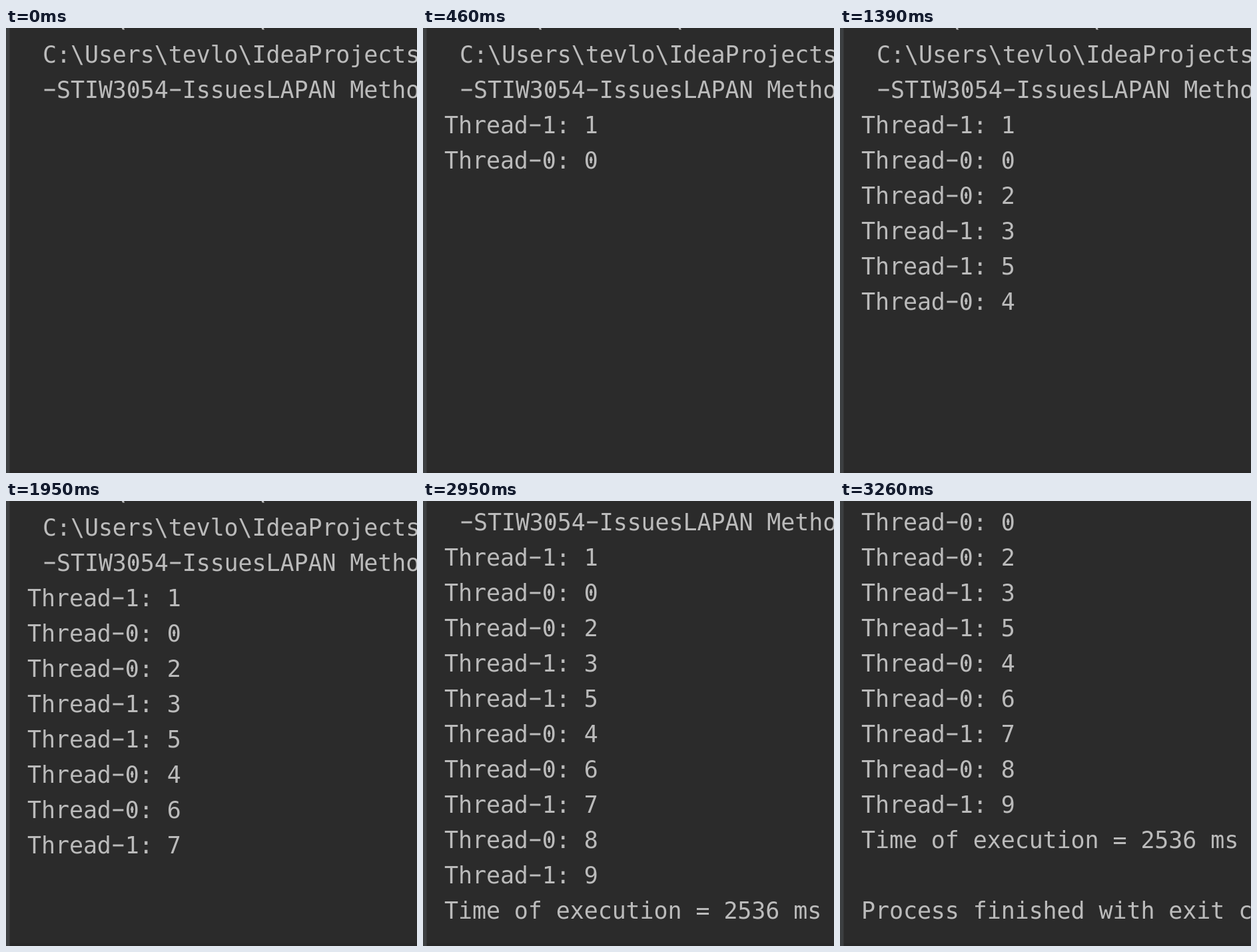
Recreate the animation shown at these times as an HTML page with a canvas. Size 617x668 px, loop 4210 ms.

```html
<!DOCTYPE html>
<html lang="en">
<head>
<meta charset="utf-8">
<title>Console output</title>
<style>
  html, body { margin: 0; width: 100%; height: 100%; overflow: hidden; background: #2b2b2b; }
  canvas { display: block; }
</style>
</head>
<body>
<canvas id="stage" width="617" height="668"></canvas>
<script>
const W = 617, H = 668, LOOP = 4210;
const ROW = 53, CELL = 20.97, LEFT = 32, INDENT = 55, BASE = -1;
const ctx = document.getElementById("stage").getContext("2d");

// Console rows; the first one shows only the feet of its backslashes.
const header = [
  "     \\         \\",
  "C:\\Users\\tevlo\\IdeaProjects\\",
  "-STIW3054-IssuesLAPAN Method"
];
const output = [
  ...["1: 1", "0: 0", "0: 2", "1: 3", "1: 5", "0: 4", "0: 6", "1: 7", "0: 8", "1: 9"]
    .map(s => "Thread-" + s),
  "Time of execution = 2536 ms",
  "",
  "Process finished with exit code 0"
];

// Start time, printed output rows, scroll offset.
const steps = [
  { at: 0, rows: 0, scroll: 0 },
  { at: 460, rows: 2, scroll: 0 },
  { at: 930, rows: 4, scroll: 0 },
  { at: 1390, rows: 6, scroll: 0 },
  { at: 1950, rows: 8, scroll: 0 },
  { at: 2410, rows: 10, scroll: 8 },
  { at: 2950, rows: 11, scroll: 61 },
  { at: 3260, rows: 13, scroll: 167 }
];

function rect(color, x, y, w, h) {
  ctx.fillStyle = color;
  ctx.fillRect(x, y, w, h);
}

// Wide hyphens and zeros with an upright bar, as in a coding font.
function drawRow(text, left, y) {
  [...text].forEach((ch, i) => {
    const x = left + i * CELL;
    if (x > W) return;
    if (ch === "-") ctx.fillRect(x + 2.6, y - 13.5, 16, 3);
    else ctx.fillText(ch, x, y);
    if (ch === "0") ctx.fillRect(x + 9, y - 17.5, 3, 9.5);
  });
}

function draw(t) {
  const step = steps.findLast(s => t >= s.at);
  rect("#2b2b2b", 0, 0, W, H);
  rect("#282828", 0, 664, W, 4);
  rect("#3c3f41", 0, 0, 5.5, H);

  ctx.fillStyle = "#bbbbbb";
  ctx.font = '35px "DejaVu Sans Mono", monospace';
  ctx.textBaseline = "alphabetic";
  const rows = header.concat(output.slice(0, step.rows));
  rows.forEach((text, i) => {
    const left = i < header.length ? INDENT : LEFT;
    drawRow(text, left, BASE + i * ROW - step.scroll);
  });
}

const start = performance.now();
function tick() {
  draw((performance.now() - start) % LOOP);
  requestAnimationFrame(tick);
}
tick();
</script>
</body>
</html>
```
